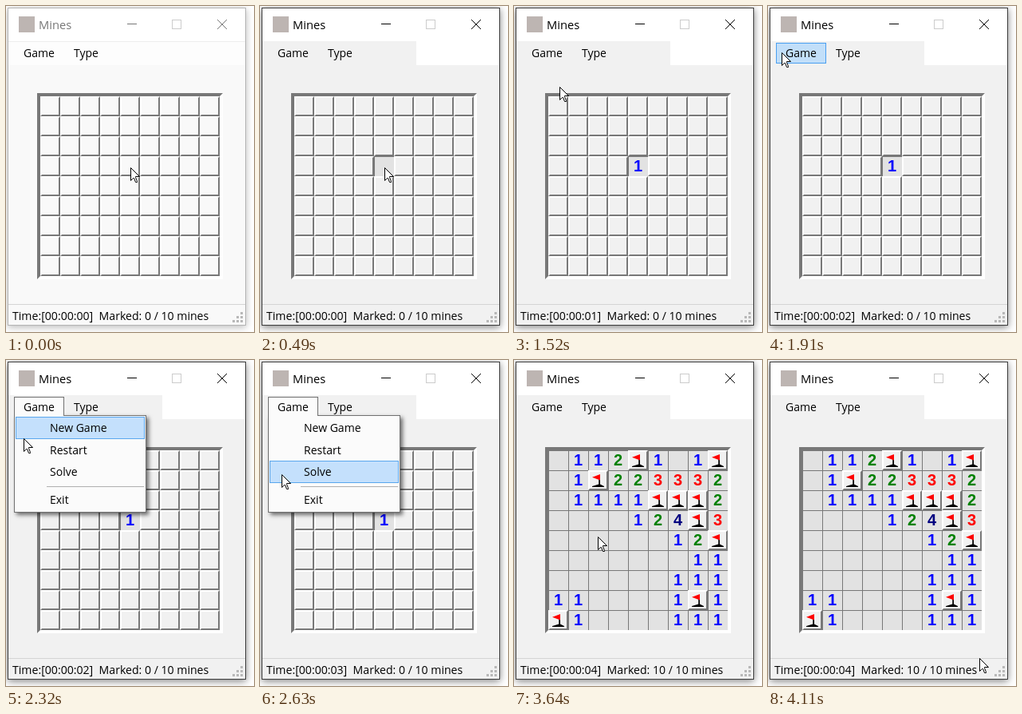
An HTML page with a canvas that plays this animation: 311 px wide and 408 px high, repeating every 5.45 s.

```html
<!DOCTYPE html>
<html lang="en">
<head>
<meta charset="utf-8">
<title>Mines</title>
<style>
html, body { margin: 0; width: 100%; height: 100%; overflow: hidden; background: #fff; }
canvas { display: block; }
</style>
</head>
<body>
<canvas id="stage" width="311" height="408"></canvas>
<script>
const ctx = document.getElementById('stage').getContext('2d');
const LOOP = 5450;
const LEFT = 43, TOP = 113, TILE = 25, SIZE = 9;
const DARK = '#787878';
const INK = { 1: '#0000ff', 2: '#008000', 3: '#ff0000', 4: '#000080' };
const BOARD = [
  '.112F1.1F',
  '.1F223332',
  '.1111FFF2',
  '....124F3',
  '......12F',
  '.......11',
  '......111',
  '11....1F1',
  'F1....111'
];
const ITEMS = [['New Game', 71], ['Restart', 99], ['Solve', 126], ['Exit', 161]];

const ACTIVATE = 490, REVEAL = 590, MENU_OPEN = 1930, MENU_CLOSE = 2950;
const SOLVE = 3040, ALL_OPEN = 3100;
const TICKS = [1170, 1790, 2560, 2970];

// Pointer path: time, x, y, eased
const PATH = [
  [0, 156, 202], [1160, 156, 202], [1170, 157, 204], [1710, 18, 60, true],
  [1740, 18, 60], [1900, 17, 58], [2120, 17, 58], [2320, 22, 98],
  [2630, 27, 143], [2950, 27, 143], [2970, 29, 142], [3480, 29, 142],
  [3900, 261, 384, true], [4020, 264, 375], [4040, 264, 375],
  [4110, 265, 373], [LOOP, 265, 373]
];

function pointerAt(t) {
  const i = PATH.findIndex(p => p[0] > t);
  const [t0, x0, y0] = PATH[i - 1], [t1, x1, y1, eased] = PATH[i];
  let k = (t - t0) / (t1 - t0);
  if (eased) k = k * k * (3 - 2 * k);
  return { x: Math.round(x0 + (x1 - x0) * k), y: Math.round(y0 + (y1 - y0) * k) };
}

function rect(x, y, w, h, fill) {
  ctx.fillStyle = fill;
  ctx.fillRect(x, y, w, h);
}

function box(x, y, w, h, fill, line) {
  rect(x, y, w, h, line);
  rect(x + 1, y + 1, w - 2, h - 2, fill);
}

function poly(points, fill) {
  ctx.beginPath();
  points.forEach(([x, y]) => ctx.lineTo(x, y));
  ctx.closePath();
  ctx.fillStyle = fill;
  ctx.fill();
}

function line(color, ...points) {
  ctx.beginPath();
  points.forEach(([x, y], i) => i % 2 ? ctx.lineTo(x, y) : ctx.moveTo(x, y));
  ctx.strokeStyle = color;
  ctx.lineWidth = 1;
  ctx.stroke();
}

function text(str, x, y, fill = '#000', size = 14) {
  ctx.font = `${size}px "Open Sans", "Noto Sans", sans-serif`;
  ctx.textAlign = 'left';
  ctx.fillStyle = fill;
  ctx.fillText(str, x, y);
}

function bevel(x, y, w, h, d, topLeft, bottomRight) {
  rect(x, y, w, h, bottomRight);
  poly([[x, y], [x + w, y], [x + w - d, y + d], [x + d, y + h - d], [x, y + h]], topLeft);
}

function shadowed(color, blur, dx, dy, draw) {
  ctx.save();
  ctx.shadowColor = color;
  ctx.shadowBlur = blur;
  ctx.shadowOffsetX = dx;
  ctx.shadowOffsetY = dy;
  draw();
  ctx.restore();
}

function drawWindow(active, face) {
  const edge = active ? '#3c3c3c' : '#b4b4b4';
  const ink = active ? '#000' : '#777';
  rect(0, 0, 311, 408, '#fff');
  shadowed(`rgba(0,0,0,${active ? 0.5 : 0.28})`, 9, 0, 2, () => rect(2, 2, 299, 398, edge));
  rect(3, 3, 297, 396, face);
  rect(3, 3, 297, 41, '#fff');
  if (active) rect(196, 44, 104, 30, '#fff');
  else {
    rect(3, 44, 297, 30, '#fdfdfd');
    rect(3, 44, 297, 1, '#eee');
  }

  rect(16, 13, 20, 20, '#bdb5b2');
  text('Mines', 41, 29, ink, 14.7);
  rect(152, 22, 12, 1, ink);
  box(208, 17, 12, 12, '#fff', '#ccc');
  line(ink, [265, 17], [277, 29], [277, 17], [265, 29]);

  rect(3, 373, 297, 1, '#d4d4d4');
  for (let row = 0; row < 3; row++)
    for (let col = 2 - row; col < 3; col++)
      rect(284 + col * 5, 383 + row * 5, 3, 3, '#b8b8b8');
}

function drawFlag(x, y) {
  const at = pts => pts.map(([u, v]) => [x + u * TILE, y + v * TILE]);
  poly(at([[.6, .35], [.6, .7], [.8, .8], [.8, .84], [.2, .84], [.2, .8], [.53, .7], [.53, .35]]), '#000');
  poly(at([[.6, .2], [.6, .5], [.2, .35]]), '#ff0000');
}

// The solver uncovers cells in reading order
function solvedCount(t) {
  if (t < SOLVE) return 0;
  return t < SOLVE + 40 ? 27 : t < ALL_OPEN ? 55 : 81;
}

function drawCell(col, row, t, face) {
  const x = LEFT + col * TILE, y = TOP + row * TILE;
  const mark = BOARD[row][col];
  const clicked = col === 4 && row === 3;
  const solved = row * SIZE + col < solvedCount(t);
  const open = mark !== 'F' && (solved || clicked && t >= ACTIVATE);

  if (!open) {
    bevel(x, y, TILE, TILE, 2, '#fff', DARK);
    rect(x + 2, y + 2, TILE - 4, TILE - 4, face);
    if (mark === 'F' && t >= SOLVE) drawFlag(x, y);
    return;
  }
  rect(x, y, TILE, TILE, DARK);
  rect(x + 1, y + 1, TILE - 1, TILE - 1, '#e2e2e2');
  if (INK[mark] && (t >= REVEAL || !clicked)) {
    ctx.font = 'bold 20px "Liberation Sans", Arial, sans-serif';
    ctx.textAlign = 'center';
    ctx.fillStyle = INK[mark];
    ctx.fillText(mark, x + 12.5, y + 19);
  }
}

function drawBoard(t, face) {
  const side = SIZE * TILE + 8;
  bevel(LEFT - 4, TOP - 4, side, side, 4, DARK, '#fff');
  for (let row = 0; row < SIZE; row++)
    for (let col = 0; col < SIZE; col++) drawCell(col, row, t, face);
}

function drawMenu(t, pointer) {
  const open = t >= MENU_OPEN && t < MENU_CLOSE;
  const hover = t < MENU_OPEN && pointer.x < 73 && pointer.y < 71;
  if (hover) box(10, 46, 63, 26, '#c2dff9', '#4a9ff0');
  if (open) {
    shadowed('rgba(0,0,0,.55)', 5, 3, 3, () => rect(10, 69, 166, 122, '#707070'));
    box(10, 46, 63, 25, '#fbfbfb', '#707070');
    box(10, 69, 166, 122, '#fbfbfb', '#707070');
    rect(11, 68, 61, 3, '#fbfbfb');
    for (const [label, y] of ITEMS) {
      if (pointer.y >= y && pointer.y < y + 28) box(12, y, 162, 28, '#c4e0fc', '#5aa7ee');
      text(label, 55, y + 19);
    }
    rect(51, 158, 122, 1, '#b0b0b0');
  }
  text('Game', 22, 64);
  text('Type', 85, 64);
}

function drawPointer({ x, y }) {
  const shape = [[0, 0], [0, 16], [3, 13], [4, 13], [6, 18], [8, 18], [8, 17], [6, 12], [6, 11], [11, 11]];
  poly(shape.map(([u, v]) => [x + u + .5, y + v + .5]), '#fff');
  ctx.strokeStyle = '#000';
  ctx.lineWidth = 1;
  ctx.stroke();
}

function draw(t) {
  const active = t >= ACTIVATE;
  const face = active ? '#f1f1f1' : '#f9f9f9';
  const pointer = pointerAt(t);
  const seconds = TICKS.filter(tick => t >= tick).length;
  const marked = t >= SOLVE ? 10 : 0;
  drawWindow(active, face);
  text(`Time:[00:00:0${seconds}]  Marked: ${marked} / 10 mines`, 8, 392.5, '#000', 14.1);
  drawBoard(t, face);
  drawMenu(t, pointer);
  drawPointer(pointer);
}

const start = performance.now();
function frame() {
  draw((performance.now() - start) % LOOP);
  requestAnimationFrame(frame);
}
frame();
</script>
</body>
</html>
```
